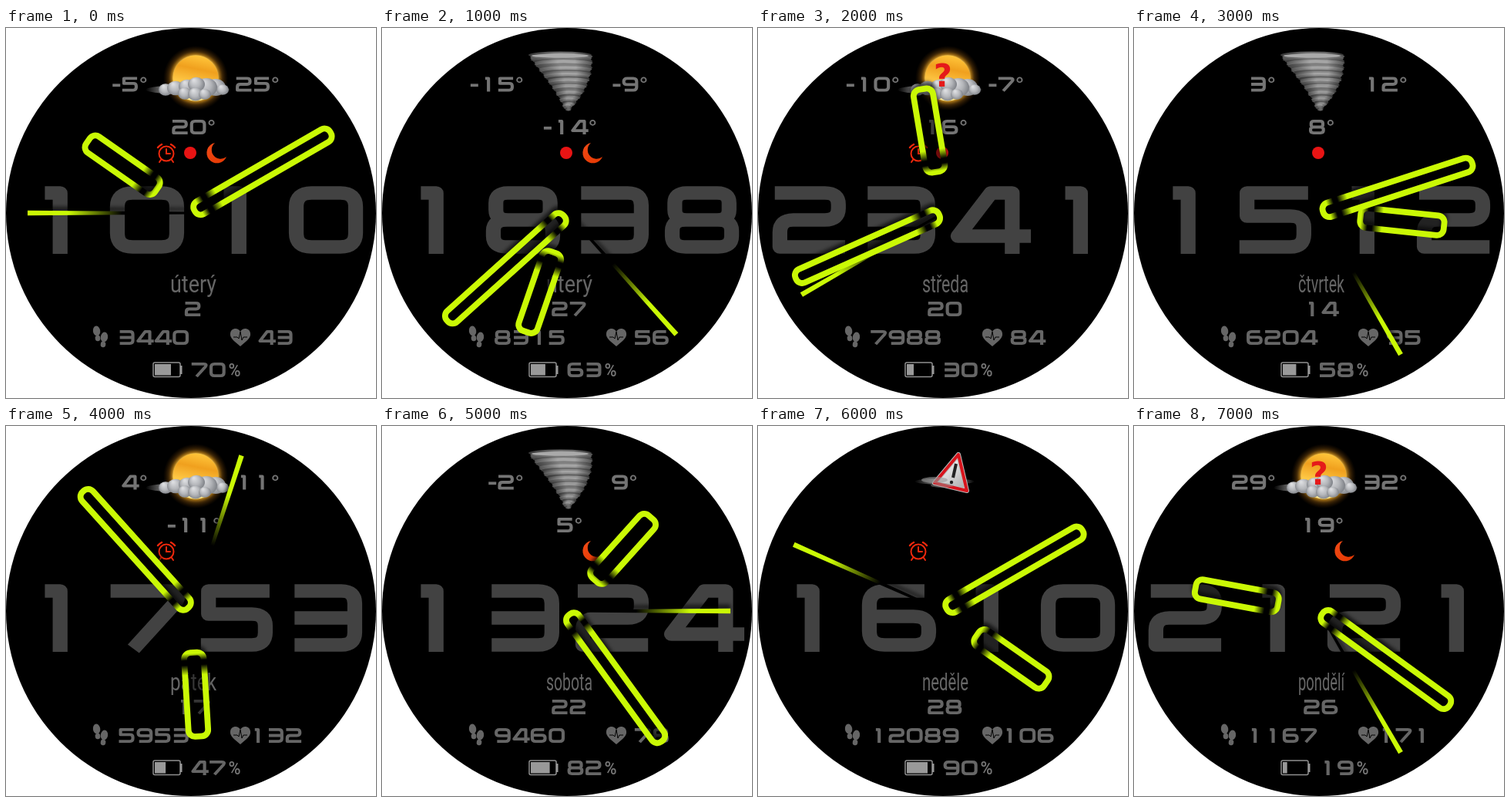
Write an HTML page with a canvas that moves like this. It is 480 px wide and 480 px high and loops after 8 s.

```html
<!DOCTYPE html>
<html lang="cs">
<meta charset="utf-8">
<title>Watch face</title>
<style>
html, body { margin: 0; width: 100%; height: 100%; overflow: hidden; background: #fff; }
canvas { display: block; }
</style>
<canvas width="480" height="480"></canvas>
<script>
const c = document.querySelector('canvas').getContext('2d');
const LIME = '#caf905', GREY = '#666', RED = '#f0280c';

// Wide numerals, stroked in an 88 x 88 box
const glyphs = {
  0: 'M27 9H61Q79 9 79 27V61Q79 79 61 79H27Q9 79 9 61V27Q9 9 27 9Z',
  1: 'M29 9H47V88',
  2: 'M3 9H62Q78 9 78 24V29Q78 44 62 44H25Q9 44 9 60V79H86',
  3: 'M7 9H62Q78 9 78 25V63Q78 79 62 79H7M7 44H78',
  4: 'M94 65H8L47 9H72V88',
  5: 'M83 9H11V39H62Q78 39 78 54V63Q78 79 62 79H2',
  6: 'M74 9H27Q9 9 9 27V61Q9 79 27 79H61Q79 79 79 63V58Q79 42 61 42H9',
  7: 'M1 9H68Q88 9 76 26L28 84',
  8: 'M26 9H62Q76 9 76 22V31Q76 44 62 44H26Q12 44 12 31V22Q12 9 26 9ZM25 44H63Q79 44 79 58V65Q79 79 63 79H25Q9 79 9 65V58Q9 44 25 44Z',
  9: 'M14 79H61Q79 79 79 61V27Q79 9 61 9H27Q9 9 9 25V30Q9 46 27 46H79',
  '-': 'M6 50H48',
  '°': 'M6 18a13 14 0 1 0 26 0a13 14 0 1 0-26 0'
};
for (const k in glyphs) glyphs[k] = new Path2D(glyphs[k]);

const states = [
  { time: '1010', sec: 45, name: 'úterý', day: 2, steps: 3440, pulse: 43, power: 70, icons: 'abm', sky: 'sun', low: -5, high: 25, now: 20 },
  { time: '1838', sec: 23, name: 'úterý', day: 27, steps: 8315, pulse: 56, power: 63, icons: 'bm', sky: 'tornado', low: -15, high: -9, now: -14 },
  { time: '2341', sec: 40, name: 'středa', day: 20, steps: 7988, pulse: 84, power: 30, icons: 'ab', sky: 'sun?', low: -10, high: -7, now: 16 },
  { time: '1512', sec: 25, name: 'čtvrtek', day: 14, steps: 6204, pulse: 95, power: 58, icons: 'b', sky: 'tornado', low: 3, high: 12, now: 8 },
  { time: '1753', sec: 3, name: 'pátek', day: 17, steps: 5953, pulse: 132, power: 47, icons: 'a', sky: 'sun', low: 4, high: 11, now: -11 },
  { time: '1324', sec: 15, name: 'sobota', day: 22, steps: 9460, pulse: 78, power: 82, icons: 'm', sky: 'tornado', low: -2, high: 9, now: 5 },
  { time: '1610', sec: 49, name: 'neděle', day: 28, steps: 12089, pulse: 106, power: 90, icons: 'a', sky: 'warning' },
  { time: '2121', sec: 25, name: 'pondělí', day: 26, steps: 1167, pulse: 171, power: 19, icons: 'm', sky: 'sun?', low: 29, high: 32, now: 19 }
];

function at(x, y, draw) {
  c.save();
  c.translate(x, y);
  draw();
  c.restore();
}

function disc(x, y, rx, fill, ry = rx) {
  c.fillStyle = fill;
  c.beginPath();
  c.ellipse(x, y, rx, ry, 0, 0, 7);
  c.fill();
}

function shape(d, fill, stroke, width) {
  const path = new Path2D(d);
  if (fill) { c.fillStyle = fill; c.fill(path); }
  if (stroke) { c.strokeStyle = stroke; c.lineWidth = width; c.stroke(path); }
}

function fade(gradient, ...stops) {
  stops.forEach(([p, color]) => gradient.addColorStop(p, color));
  return gradient;
}

// align: 0 left, 0.5 centre, 1 right
function numerals(value, x, y, { align = 0, color = GREY, height = 19, step = 98.5 } = {}) {
  const chars = [...String(value)], scale = height / 88;
  const advance = ch => ch === '-' ? 57 : ch === '°' ? 41 : step;
  const width = chars.reduce((sum, ch) => sum + advance(ch), 0) * scale * 1.1;
  at(x - width * align, y, () => {
    c.scale(scale * 1.1, scale);
    c.lineJoin = 'round';
    c.strokeStyle = color;
    for (const ch of chars) {
      c.lineWidth = ch === '°' ? 8 : 17.5;
      c.stroke(glyphs[ch]);
      c.translate(advance(ch), 0);
    }
  });
}

function label(text, x, y, font, color, maxWidth) {
  c.font = font;
  c.textAlign = 'center';
  c.fillStyle = color;
  c.fillText(text, x, y, maxWidth);
}

function cloud() {
  const wisp = fade(c.createLinearGradient(181, 0, 292, 0), [0, '#8880'], [.25, '#999'], [.85, '#999'], [1, '#8880']);
  disc(236, 80, 55, wisp, 6);
  const lumps = [[207, 80, 9], [272, 77, 13], [281, 80, 8], [220, 78, 11], [260, 77, 14], [235, 76, 11], [247, 73, 11], [232, 85, 9], [246, 86, 10], [258, 86, 8]];
  for (const [x, y, r] of lumps) {
    const shade = fade(c.createRadialGradient(x - r * .3, y - r * .5, 1, x, y, r * 1.1), [0, '#dcdde0'], [.5, '#b4b6ba'], [1, '#74777d']);
    disc(x, y, r, shade, r * .85);
  }
}

const skies = {
  sun() {
    disc(246, 65, 42, fade(c.createRadialGradient(246, 65, 28, 246, 65, 42), [0, '#ffe27a'], [.2, '#c98a1acc'], [.5, '#80500e77'], [1, '#50280000']));
    disc(246, 65, 29.5, fade(c.createLinearGradient(252, 36, 240, 94), [0, '#ffc53a'], [.3, '#f0a01e'], [.65, '#ffcb48'], [1, '#fff0a0']));
    cloud();
  },
  'sun?'() {
    skies.sun();
    label('?', 240, 76, 'bold 41px "DejaVu Sans", sans-serif', '#e51a1a');
  },
  tornado() {
    for (let i = 0; i <= 34; i++) {
      const t = i / 34, grey = 105 + 70 * Math.abs(Math.sin(i * 2.3)) - 25 * t;
      const half = 4 + 37 * (1 - t ** 1.3), x = 231 + 12 * Math.sin(t * 2.2) + Math.sin(i * 1.7);
      const side = `rgb(${grey * .5},${grey * .5},${grey * .5})`, mid = `rgb(${grey},${grey},${grey})`;
      disc(x, 35 + t * 70, half, fade(c.createLinearGradient(x - half, 0, x + half, 0), [0, side], [.4, mid], [.7, mid], [1, side]), 4.5 - 2 * t);
    }
    disc(231, 36, 37, '#aaa', 2.5);
  },
  warning() {
    disc(242, 72, 39, fade(c.createLinearGradient(203, 0, 281, 0), [0, '#8880'], [.4, '#888'], [.7, '#777'], [1, '#8880']), 4);
    c.lineJoin = 'round';
    shape('M260 37L229 74L271 84Z', fade(c.createLinearGradient(235, 45, 265, 85), [0, '#fff'], [1, '#aaa']), '#bbb', 6);
    shape('M260 37L229 74L271 84Z', null, '#d8141c', 4);
    shape('M257 49L253 67', null, '#222', 4);
    disc(251, 73, 2.2, '#222');
    disc(229, 70, 17, '#9999', 4);
    disc(239, 77, 15, '#9997', 3);
  }
};

const icons = {
  a() {
    at(208, 162, () => {
      c.lineCap = 'round';
      shape('M9.5 1A9.5 9.5 0 1 1-9.5 1A9.5 9.5 0 1 1 9.5 1M0-5V1H5M-7 9L-9 12M7 9L9 12', null, RED, 2);
      shape('M-11-7A16 16 0 0 1-6-11M11-7A16 16 0 0 0 6-11', null, RED, 2.5);
    });
  },
  b() { disc(239, 162, 8, '#e81414'); },
  m() {
    shape('M271 149A13.3 13.3 0 1 0 286 167A11.5 11.5 0 0 1 271 149Z',
      fade(c.createLinearGradient(262, 150, 280, 176), [0, '#f04a16'], [1, '#e63a04']));
  }
};

function feet() {
  for (const [x, y] of [[118, 396], [127, 404]]) at(x, y, () => {
    c.rotate(x < 120 ? -.15 : .15);
    disc(0, -3, 4.7, GREY, 6.5);
    disc(0, 6.5, 3.3, GREY, 3.8);
  });
}

function heart() {
  shape('M304 413C296 406 290 402 291 396C292 389 301 388 304 394C307 388 316 389 317 396C318 402 312 406 304 413Z', GREY);
  shape('M295 401H300L302 403L304 394L306 405L308 401H313', null, '#000', 1);
}

function battery(power) {
  c.strokeStyle = '#909090';
  c.lineWidth = 1.5;
  c.beginPath();
  c.roundRect(191, 434, 35, 18.5, 2);
  c.stroke();
  c.fillStyle = '#999';
  c.fillRect(193, 436, power * .3, 14.5);
  c.fillRect(226, 438, 2.5, 11);
  numerals(power, 240.5, 434);
  label('%', 296.5, 452, '500 23px Roboto, sans-serif', '#777', 16);
}

function turned(degrees, draw) {
  at(240, 240, () => {
    c.rotate(degrees * Math.PI / 180);
    c.shadowColor = '#000a';
    c.shadowBlur = 5;
    c.shadowOffsetY = -5;
    draw();
  });
}

// Outlined bar between two radii, with a dark band near its inner end
function bar(degrees, inner, outer, width, dark) {
  turned(degrees, () => {
    const pos = r => (r - inner) / (outer - inner);
    c.strokeStyle = fade(c.createLinearGradient(0, -inner, 0, -outer),
      [0, LIME], [pos(dark - 12), LIME], [pos(dark - 3), '#000'], [pos(dark + 3), '#000'], [pos(dark + 16), LIME]);
    c.lineWidth = 7.8;
    c.beginPath();
    c.roundRect(-width / 2, -outer, width, outer - inner, 8.5);
    c.fillStyle = '#0005';
    c.fill();
    c.stroke();
  });
}

function secondHand(degrees) {
  turned(degrees, () => shape('M-3.3-212H3.3L1.4 0H-1.4Z',
    fade(c.createLinearGradient(0, 0, 0, -212), [0, '#000'], [.42, '#000'], [.75, LIME], [1, LIME])));
}

function draw(s) {
  c.clearRect(0, 0, 480, 480);
  disc(240, 240, 240, '#000');

  numerals(s.time, 18.5, 205, { color: '#424242', height: 88, step: 105.5 });
  skies[s.sky]();
  if (s.now !== undefined) {
    const color = '#747474';
    numerals(s.low + '°', 183.5, 63.5, { align: 1, color });
    numerals(s.high + '°', 298, 63.5, { color });
    numerals(s.now + '°', 243.5, 119, { align: .5, color });
  }
  for (const key of s.icons) icons[key]();

  label(s.name, 243, 343, '30.5px Roboto, sans-serif', GREY, 60);
  numerals(s.day, 243.5, 355, { align: .5 });
  feet();
  numerals(s.steps, 146, 392);
  heart();
  numerals(s.pulse, 351, 392, { align: .5 });
  battery(s.power);

  const hours = +s.time.slice(0, 2), minutes = +s.time.slice(2);
  secondHand(s.sec * 6);
  bar(hours * 30 + minutes / 2, 54, 163, 25.5, 67);
  bar(minutes * 6, 5.5, 209, 19, 25);
}

function tick() {
  draw(states[Math.floor(performance.now() / 1000) % states.length]);
  requestAnimationFrame(tick);
}
tick();
</script>
</html>
```
